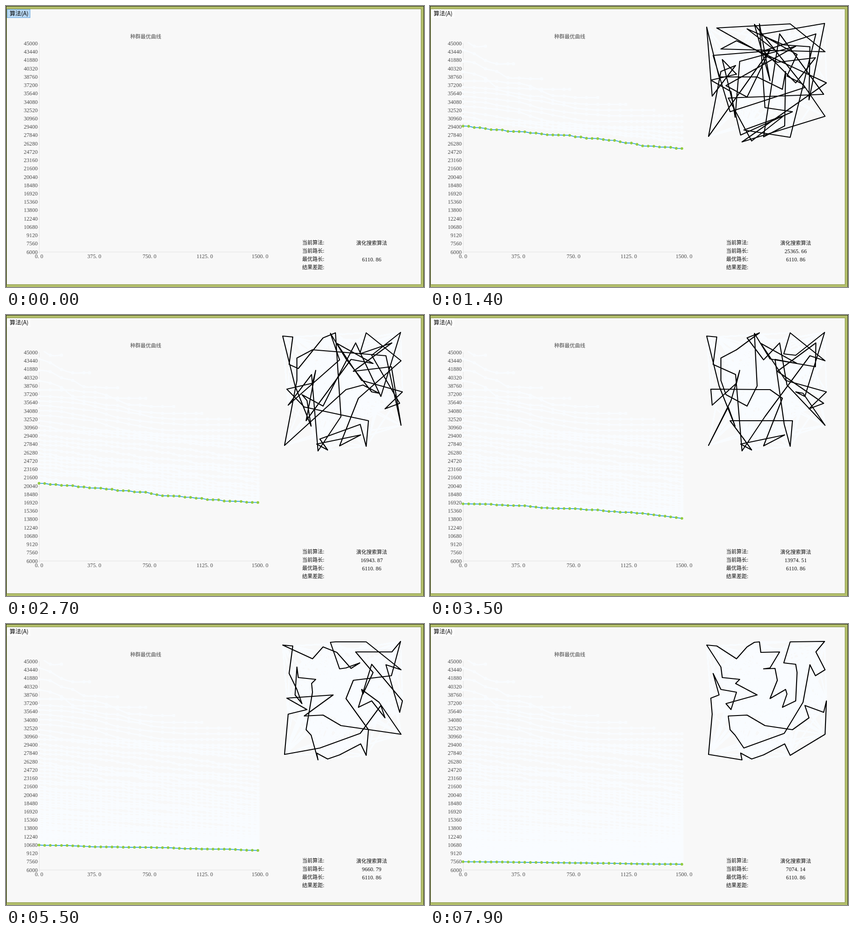
These frames come from a looping animation (911x614 px, 8 s). An HTML page with a canvas:

```html
<!DOCTYPE html>
<html lang="zh">
<head>
<meta charset="utf-8">
<style>
  html, body { margin: 0; width: 911px; height: 614px; overflow: hidden; background: #f8f8f8; }
  canvas, svg { position: absolute; left: 0; top: 0; }
  text { font: 11.25px "Noto Sans CJK SC", "Noto Sans CJK", sans-serif; fill: #111; }
  .num { font: 12.1px "Liberation Serif", "Noto Serif", serif; }
  .axis { fill: #4a4a4a; }
  .menu { font-size: 12.5px; fill: #000; }
</style>
</head>
<body>
<canvas id="stage" width="911" height="614"></canvas>
<svg id="labels" width="911" height="614"></svg>
<script>
const STEP = 100, FRAMES = 80;
const ctx = document.getElementById('stage').getContext('2d');
const svg = document.getElementById('labels');

// Best length at the end and at the start of the plotted window
const KEYS = [1, 3, 5, 8, 20, 35, 46, 64, 79];
const ENDS = [44500, 38400, 34900, 31494.22, 20633.30, 13974.51, 11080.37, 8610.61, 7074.14];
const STARTS = [46000, 41700, 38000, 35100, 24820, 16700, 12750, 9200, 7550];

// Cities, in the order of the final tour
const CITIES = [
  603,46, 625,48, 668,76, 691,50, 707,40, 718,39, 721,62, 762,61, 741,96, 727,98,
  752,97, 757,123, 741,163, 775,143, 778,153, 768,182, 797,168, 800,106, 797,88, 771,85,
  785,39, 860,38, 841,61, 861,100, 840,113, 828,89, 813,171, 772,239, 684,271, 665,243,
  654,231, 650,201, 691,199, 730,222, 790,231, 826,205, 817,178, 858,193, 864,168, 861,241,
  785,287, 773,262, 727,286, 701,295, 677,282, 680,297, 607,285, 615,197, 612,162, 630,155,
  617,108, 634,143, 668,149, 656,187, 645,174, 713,155, 666,130, 675,121, 637,117, 634,94
];
const COUNT = CITIES.length / 2;

function noise(n) {
  const s = Math.sin(n * 12.9898) * 43758.5453;
  return s - Math.floor(s);
}

function seeded(seed) {
  return () => (seed = (seed * 16807) % 2147483647) / 2147483647;
}

function dist(a, b) {
  return Math.hypot(CITIES[2 * a] - CITIES[2 * b], CITIES[2 * a + 1] - CITIES[2 * b + 1]);
}

function reverse(tour, i, j) {
  return [...tour.slice(0, i), ...tour.slice(i, j + 1).reverse(), ...tour.slice(j + 1)];
}

// Walks back from the final tour, tangling it until its length fits each frame
function evolve() {
  const rand = seeded(4217), all = [];
  const index = () => 1 + Math.floor(rand() * (COUNT - 1));
  let tour = Array.from({ length: COUNT }, (_, i) => i);
  const shortest = tour.reduce((sum, c) => sum + dist(c, (c + 1) % COUNT), 0);
  const final = follow(ENDS, FRAMES - 1);
  let length = shortest;
  for (let f = FRAMES - 1; f > 0; f--) {
    const goal = shortest * (follow(ENDS, f) / final) ** 0.85;
    for (let n = 0; n < 900 && length < goal; n++) {
      const p = index(), q = index(), i = Math.min(p, q), j = Math.max(p, q);
      const a = tour[i - 1], b = tour[i], c = tour[j], d = tour[(j + 1) % COUNT];
      const gain = dist(a, c) + dist(b, d) - dist(a, b) - dist(c, d);
      if (gain > 1 && gain < 8 + 1.3 * (goal - length)) {
        tour = reverse(tour, i, j);
        length += gain;
      }
    }
    all[f] = tour;
  }
  return all;
}

// Smooth curve through the keys, on a logarithmic scale
function follow(values, f) {
  const last = KEYS.length - 1;
  let i = 0;
  while (i < last - 1 && f >= KEYS[i + 1]) i++;
  const y = values.map(Math.log);
  const slope = k => (y[k + 1] - y[k]) / (KEYS[k + 1] - KEYS[k]);
  const tangent = k => {
    if (k === 0) return slope(0);
    if (k === last) return slope(last - 1);
    const l = KEYS[k] - KEYS[k - 1], r = KEYS[k + 1] - KEYS[k];
    return (slope(k - 1) * r + slope(k) * l) / (l + r);
  };
  const h = KEYS[i + 1] - KEYS[i], u = (f - KEYS[i]) / h, v = 1 - u;
  return Math.exp(v * v * (1 + 2 * u) * y[i] + u * u * (3 - 2 * u) * y[i + 1]
    + h * u * v * (v * tangent(i) - u * tangent(i + 1)));
}

const toY = v => 537.5 - (v - 6000) / 39000 * 455.5;

// Descending staircase of up to 40 samples
function samples(f) {
  const last = Math.min(39, 5 * f - 1), sparse = 34 - 7 * Math.max(0, f - 8);
  const from = follow(STARTS, f), to = follow(ENDS, f);
  const sums = [0];
  for (let k = 1; k <= last; k++) {
    const r = noise(f * 7 + k);
    sums.push(sums[k - 1] + (r < 0.45 ? 0.4 + r : 0.08));
  }
  const points = [];
  for (let k = 0; k <= last; k++) {
    if (k % 2 && k <= sparse && k < last) continue;
    let p = sums[k] / sums[last];
    if (f < 11) {
      p = Math.min(1, p / 0.75);
      p = p * p * (3 - 2 * p);
    }
    points.push([72 + k * 12.23, toY(from + (to - from) * p)]);
  }
  return points;
}

function drawCurve(points, line, dot, width, radius) {
  const at = i => points[Math.max(0, Math.min(points.length - 1, i))];
  ctx.beginPath();
  ctx.moveTo(...points[0]);
  for (let i = 0; i < points.length - 1; i++) {
    const [a, b, c, d] = [at(i - 1), at(i), at(i + 1), at(i + 2)];
    ctx.bezierCurveTo(b[0] + (c[0] - a[0]) / 6, b[1] + (c[1] - a[1]) / 6,
      c[0] - (d[0] - b[0]) / 6, c[1] - (d[1] - b[1]) / 6, c[0], c[1]);
  }
  ctx.strokeStyle = line;
  ctx.lineWidth = width;
  ctx.stroke();
  ctx.fillStyle = dot;
  for (const [x, y] of points) {
    ctx.beginPath();
    ctx.arc(x, y, radius, 0, 7);
    ctx.fill();
  }
}

function drawTour(tour, color, width) {
  ctx.beginPath();
  for (const c of tour) ctx.lineTo(CITIES[2 * c], CITIES[2 * c + 1]);
  ctx.closePath();
  ctx.strokeStyle = color;
  ctx.lineWidth = width;
  ctx.stroke();
}

function rect(color, x, y, w, h) {
  ctx.fillStyle = color;
  ctx.fillRect(x, y, w, h);
}

function drawWindow(f) {
  rect('#20240f', 0, 0, 911, 614);
  rect('#b2be6a', 1, 1, 909, 613);
  rect('#8f9a55', 1, 6, 904, 603);
  rect('#f8f8f8', 2, 7, 902, 601);
  if (f === 0) {
    rect('#66a7e0', 2, 7, 51, 19);
    rect('#b8d8f4', 3, 8, 49, 17);
  } else {
    rect('#fdfdfd', 2, 7, 51, 19);
  }
}

function drawAxes() {
  const grey = '#e2e2e2';
  rect(grey, 72, 82, 1, 456);
  rect(grey, 72, 537, 482, 1);
  for (let i = 0; i <= 25; i++) rect(grey, 69, Math.round(82 + i * 18.22), 3, 1);
  for (let i = 0; i <= 4; i++) rect(grey, Math.round(72 + i * 120.4), 538, 1, 3);
}

const tours = evolve();
const curves = tours.map((_, f) => samples(f));
const PALE = '#f9fcff';

function draw(f) {
  drawWindow(f);
  drawAxes();
  ctx.lineJoin = 'round';
  ctx.save();
  ctx.beginPath();
  ctx.rect(68, 79, 490, 470);
  ctx.clip();
  for (let i = 1; i < f; i++) drawCurve(curves[i], PALE, PALE, 3, 3.5);
  if (f) drawCurve(curves[f], '#1e9dd8', '#92cc3f', 1.7, 2.9);
  ctx.restore();
  for (let i = 1; i < f; i++) drawTour(tours[i], PALE, 3);
  if (f) drawTour(tours[f], '#000', 2.2);
  current.innerHTML = f ? spaced(follow(ENDS, f).toFixed(2)) : '';
}

// Gives the decimal point the width of a digit
function spaced(s) {
  return s.replace('.', '<tspan letter-spacing="3">.</tspan>');
}

function label(s, x, y, cls = '', anchor = 'start') {
  const t = document.createElementNS('http://www.w3.org/2000/svg', 'text');
  t.setAttribute('x', x);
  t.setAttribute('y', y);
  t.setAttribute('class', cls);
  t.setAttribute('text-anchor', anchor);
  t.innerHTML = spaced(s);
  svg.append(t);
  return t;
}

label('算法(A)', 8, 21, 'menu');
label('种群最优曲线', 304.5, 71, 'axis', 'middle');
for (let i = 0; i <= 25; i++) label(String(45000 - 1560 * i), 69, 86 + i * 18.22, 'num axis', 'end');
for (let i = 0; i <= 4; i++) label((375 * i).toFixed(1), 72 + i * 120.4, 551, 'num axis', 'middle');
['当前算法:', '当前路长:', '最优路长:', '结果差距:'].forEach((s, i) => label(s, 645.5, 521 + 18 * i));
label('演化搜索算法', 797, 521.5, '', 'middle');
label('6110.86', 797, 557.5, 'num', 'middle');
const current = label('', 797, 539.5, 'num', 'middle');

let shown = -1;
function tick() {
  const f = Math.floor(performance.now() / STEP) % FRAMES;
  if (f !== shown) draw(shown = f);
  requestAnimationFrame(tick);
}
tick();
</script>
</body>
</html>
```
